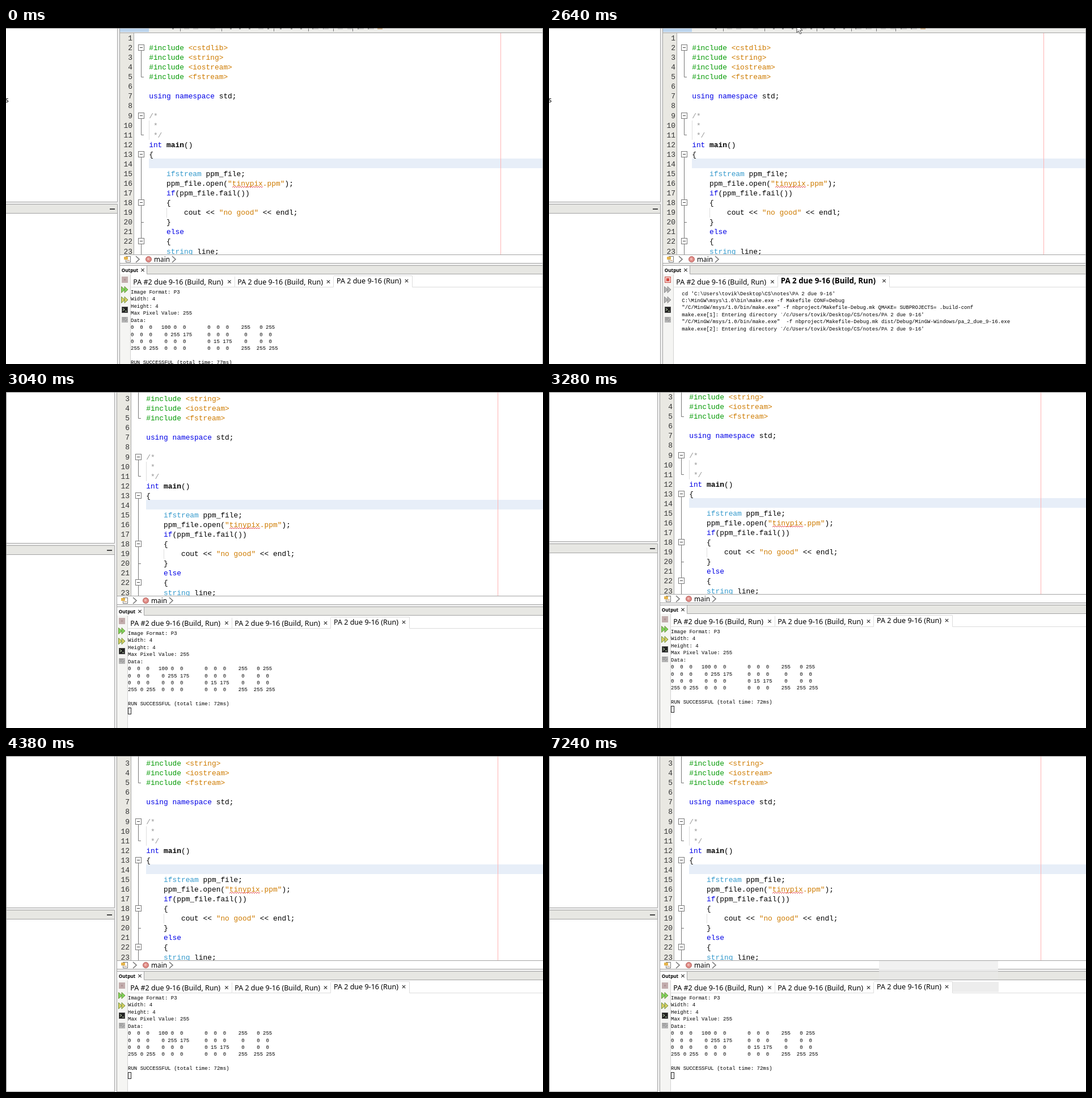
An HTML page that plays this animation: 947 px wide and 592 px high, repeating every 7800 ms.

```html
<!DOCTYPE html>
<html lang="en">
<head>
<meta charset="utf-8">
<title>Build and run</title>
<style>
html, body { margin: 0; width: 100%; height: 100%; overflow: hidden; background: #fff; }
svg { display: block; width: 947px; height: 592px; }
text { white-space: pre; }
.code { font: 12.86px "Liberation Mono", monospace; }
.out { font: 9.02px "Liberation Mono", monospace; }
.ui { font-family: "Noto Sans", "Open Sans", sans-serif; }
.k { fill: #000; } .g { fill: #009900; } .o { fill: #ce7b00; }
.b { fill: #0000e6; } .t { fill: #3399cc; } .c { fill: #969696; }
.m { fill: #000; font-weight: bold; }
</style>
</head>
<body>
<svg id="stage" viewBox="0 0 947 592"></svg>
<script>
const stage = document.getElementById('stage');
const LOOP = 7800;

function add(parent, tag, attrs = {}, content) {
  const el = document.createElementNS('http://www.w3.org/2000/svg', tag);
  for (const key in attrs) el.setAttribute(key, attrs[key]);
  if (content !== undefined) el.textContent = content;
  parent.append(el);
  return el;
}
const group = parent => add(parent, 'g');
const rect = (p, x, y, width, height, fill, extra) => add(p, 'rect', { x, y, width, height, fill, ...extra });
const path = (p, d, stroke, extra) => add(p, 'path', { d, stroke, fill: 'none', ...extra });
const label = (p, x, y, size, content, extra) =>
  add(p, 'text', { x, y, class: 'ui', 'font-size': size, ...extra }, content);
const show = (el, on) => el.setAttribute('visibility', on ? 'visible' : 'hidden');

const app = group(stage);
const LINE = '#a3a3a3', BAR = '#e7e7e3';
const codeY = n => 22 + 17.07 * (n - 1);

function drawEditor() {
  rect(app, 200, -80, 780, 88, '#eeeeeb');
  rect(app, 200, 0, 52, 7, '#bcd5ee');
  for (const x of [307, 380, 472, 533, 577, 611]) rect(app, x, 0, 1, 6, '#777');
  for (const x of [293, 395, 411, 428, 446, 461, 483, 502, 519, 540, 559, 620, 638]) rect(app, x, 0, 3, 2, '#555');
  for (const x of [314, 330, 360, 445, 542, 560, 585, 602, 622, 640]) rect(app, x, 0, 9, 2, '#b8b8b8');
  rect(app, 655, 0, 9, 2, '#b98a50');
  path(app, 'M200 8.5H980', LINE);
  rect(app, 201, 9, 24, 390, '#e9e8e2');
  path(app, 'M225.5 9V399', '#a8a8a8');
  rect(app, 252, 230, 728, 17, '#e7eef8');
  path(app, 'M252.5 163V197M283.5 317V334', '#dedede');

  const source = [
    '', '~g#include ~o<cstdlib>', '~g#include ~o<string>', '~g#include ~o<iostream>', '~g#include ~o<fstream>',
    '', '~busing ~bnamespace ~kstd;', '', '~c/*', '~c *', '~c */',
    '~bint ~mmain~k()', '~k{', '',
    '~t    ifstream ~kppm_file;',
    '~k    ppm_file.open(~o"tinypix.ppm"~k);',
    '~b    if~k(ppm_file.fail())',
    '~k    {', '~k        cout << ~o"no good"~k << endl;', '~k    }',
    '~b    else', '~k    {', '~t    string ~kline;'
  ];
  source.forEach((line, i) => {
    const y = codeY(i + 1);
    add(app, 'text', { x: 223, y, class: 'code', 'text-anchor': 'end', fill: '#333' }, i + 1);
    const row = add(app, 'text', { x: 252.2, y, class: 'code' });
    for (const part of line.split('~').slice(1)) add(row, 'tspan', { class: part[0] }, part.slice(1));
  });

  let wave = 'M399 281';
  for (let i = 1; i < 28; i++) wave += `L${399 + 2 * i} ${i % 2 ? 279 : 281}`;
  path(app, wave, '#e03030', { 'stroke-width': 0.9 });

  path(app, 'M238.5 40V86.5H243M238.5 159V188.5H243M238.5 228V399M238.5 342.5H243', '#777');
  for (const n of [2, 9, 13, 18, 22]) {
    const y = Math.round(codeY(n) - 10) + 0.5;
    rect(app, 233.5, y, 10, 10, '#fff', { stroke: '#777' });
    path(app, `M236 ${y + 5}H241`, '#444');
  }
  path(app, 'M872.5 9V399', '#ffb3b3');
}

function drawSidePanels() {
  rect(app, -10, -80, 210, 800, '#f0f0f0');
  rect(app, -10, -80, 206, 387, '#fff');
  rect(app, -10, 311, 206, 15, BAR);
  rect(app, -10, 326, 206, 400, '#fff');
  path(app, 'M196.5 -80V306.5H-10M-10 310.5H196.5V720M-10 326.5H196M200.5 0V720', LINE);
  rect(app, 183, 318, 9, 2, '#444');
  label(app, -1.2, 130.5, 12.5, 's');
}

function cross(p, x, y) {
  path(p, `M${x - 2.7} ${y - 2.7}l5.4 5.4m0 -5.4l-5.4 5.4`, '#333', { 'stroke-width': 1.2 });
}

function drawOutputFrame() {
  rect(app, 201, 399, 780, 320, '#fff');
  path(app, 'M201 399.5H980M201 414.5H980', LINE);
  rect(app, 201, 415, 780, 4, '#f0f0f0');
  rect(app, 211.5, 402.5, 8, 10, '#fff', { stroke: '#777' });
  rect(app, 208, 403, 7, 5, '#e5b44c');
  path(app, 'M213 409.5h5', '#b98e61');
  for (const x of [229, 293]) path(app, `M${x} 402l6 5.5l-6 5.5`, '#777', { 'stroke-width': 1.6 });
  add(app, 'circle', { cx: 251.5, cy: 407.5, r: 5, fill: '#df8b86', stroke: '#b45f5c' });
  add(app, 'circle', { cx: 251, cy: 407, r: 2, fill: '#f0bbb5' });
  label(app, 261, 412, 11.8, 'main');

  rect(app, 201, 419, 780, 14, BAR);
  rect(app, 201, 419, 48, 15, '#fff');
  path(app, 'M201 418.5H980M248.5 419V433.5H980', LINE);
  label(app, 203.8, 430, 8.15, 'Output', { 'font-weight': 'bold' });
  cross(app, 241, 426.5);
  rect(app, 201, 434, 18, 280, '#f5f5f3');
  path(app, 'M219.5 434V720', '#d2d2d2');

  rect(app, 204.5, 491.5, 10, 10, '#222', { stroke: '#555' });
  path(app, 'M206 494l3 2l-3 2M210 499h3', '#c9e3b8');
  rect(app, 204, 509, 11, 10, '#b4b4b4');
  path(app, 'M205 511h7M205 514h5M210 517l4 -4', '#888');
}

function runButtons(p, first, second, edge) {
  [[461, first], [479, second]].forEach(([y, fill]) => {
    for (const x of [203.5, 209]) add(p, 'path', { d: `M${x} ${y - 5.5}l6 5.5l-6 5.5z`, fill, stroke: edge });
  });
}

function tabs(p, list) {
  for (const [x, content, closeX, end, active, bold] of list) {
    const y = active ? 450 : 451.5;
    label(p, x, y, bold ? 13.3 : 12.54, content, bold ? { 'font-weight': 'bold' } : {});
    cross(p, closeX, y - 4.5);
    path(p, active ? `M${x - 5.5} 436.5H${end}.5V456.5H980` : `M${x - 4} 456.5H${end}.5V438`, '#dcdcdc');
  }
}

const outLine = (p, x, y, content) => add(p, 'text', { x, y, class: 'out' }, content);

function drawResults() {
  const p = group(app);
  rect(p, 204, 438, 11, 11, '#c2adad');
  rect(p, 208, 442, 3, 3, '#b09595');
  runButtons(p, '#7ed65a', '#d9cf62', '#6d8f3c');
  tabs(p, [
    [224.3, 'PA #2 due 9-16 (Build, Run)', 394, 403],
    [408.2, 'PA 2 due 9-16 (Build, Run)', 568.5, 577],
    [583, 'PA 2 due 9-16 (Run)', 706.5, 716, true]
  ]);
  const rows = [
    'Image Format: P3', 'Width: 4', 'Height: 4', 'Max Pixel Value: 255', 'Data:',
    '0  0  0   100 0  0       0  0  0    255   0 255',
    '0  0  0    0 255 175     0  0  0     0    0  0',
    '0  0  0    0  0  0       0 15 175    0    0  0',
    '255 0 255  0  0  0       0  0  0    255  255 255',
    '', 'RUN SUCCESSFUL (total time: 77ms)'
  ].map((row, i) => outLine(p, 220, 468 + 12.43 * i, row));
  rect(p, 220.5, 596.5, 5, 11, '#fff', { stroke: '#222' });
  return { node: p, status: rows.at(-1) };
}

function drawBuild() {
  const p = group(app);
  rect(p, 204.5, 438.5, 10, 10, '#f4c9c4', { stroke: '#c9554e' });
  rect(p, 207, 441, 5, 5, '#d6453e');
  runButtons(p, '#b5b5b5', '#b5b5b5', '#8b8b8b');
  tabs(p, [
    [224.3, 'PA #2 due 9-16 (Build, Run)', 394, 403],
    [408.8, 'PA 2 due 9-16 (Build, Run)', 591, 600, true, true]
  ]);
  const make = '"/C/MinGW/msys/1.0/bin/make.exe"';
  const enter = n => `make.exe[${n}]: Entering directory \`/c/Users/tovik/Desktop/CS/notes/PA 2 due 9-16'`;
  const lines = [
    "cd 'C:\\Users\\tovik\\Desktop\\CS\\notes\\PA 2 due 9-16'",
    'C:\\MinGW\\msys\\1.0\\bin\\make.exe -f Makefile CONF=Debug',
    make + ' -f nbproject/Makefile-Debug.mk QMAKE= SUBPROJECTS= .build-conf',
    enter(1),
    make + '  -f nbproject/Makefile-Debug.mk dist/Debug/MinGW-Windows/pa_2_due_9-16.exe',
    enter(2)
  ].map((line, i) => outLine(p, 234.3, 470.5 + 12.43 * i, line));
  return { node: p, lines };
}

drawEditor();
drawSidePanels();
drawOutputFrame();
const caret = rect(app, 275, 231, 2, 16, '#000');
const results = drawResults();
const build = drawBuild();

const tint = group(stage);
rect(tint, 582, 361, 210, 15, '#f1f1f1');
rect(tint, 582, 376, 210, 18, '#e9e9e9', { opacity: 0.7 });
rect(tint, 712, 398, 81, 18, '#ededed');

path(stage, 'M0 .5H947', '#8a8a8a');
const rightEdge = path(stage, 'M946.5 0V592', '#a8a8a8');
const leftEdge = path(stage, 'M.5 0V592', '#8a8a8a');
const bottomEdge = path(stage, 'M0 591.5H191M195 591.5H947', '#a3a3a3');

const beam = path(stage, 'M1 .5H3.5L4.5 1.5L5.5 .5H8M4.5 1.5V17.5M1 18.5H3.5L4.5 17.5L5.5 18.5H8', '#000');
const arrow = add(stage, 'path', {
  d: 'M0 0V14L3.2 11L5.5 16.5L8 15.4L5.6 10.2H10Z', fill: '#fff', stroke: '#333', 'stroke-width': 0.9
});

// time, x shift, y shift
const shifts = [[0, 0, 0], [2770, -3, -20], [2920, -5, -36], [3040, -5, -40], [3160, -5, -42], [3280, -5, -43],
  [3990, -5, -44], [4110, -5, -45], [4260, -5, -41], [4380, -5, -39]];
// time, pointer shape, x, y
const pointer = [[0], [1390, beam, 410, 125], [1510, beam, 427, 88], [1660, beam, 432, 60], [1780, beam, 436, 36],
  [1900, beam, 437, 14], [2050, arrow, 437, 3], [2290, arrow, 437, -3], [2440, arrow, 437, -6], [2770],
  [4660, beam, 582, 118], [4790, arrow, 782, 398], [4930, beam, 785, 483], [5090, beam, 819, 567], [5210],
  [5890, beam, 627, 85], [6010, beam, 680, 56], [6150, beam, 698, 48], [7120]];
const lineTimes = [0, 0, 1660, 1900, 2050, 2440];

const at = (table, t) => table.findLast(step => step[0] <= t);

function draw(t) {
  const [, dx, dy] = at(shifts, t);
  const [, shape, px, py] = at(pointer, t);
  const building = t >= 1120 && t < 2920;
  app.setAttribute('transform', `translate(${dx} ${dy})`);
  show(caret, t >= 1120 && t < 1510);
  show(results.node, !building);
  show(build.node, building);
  build.lines.forEach((line, i) => show(line, building && t >= lineTimes[i]));
  results.status.textContent = `RUN SUCCESSFUL (total time: ${t < 1120 ? 77 : 72}ms)`;
  show(tint, t >= 4790);
  show(rightEdge, !dx);
  show(leftEdge, dx);
  show(bottomEdge, t >= 4380);
  for (const el of [beam, arrow]) show(el, el === shape);
  if (shape) shape.setAttribute('transform', `translate(${px} ${py})`);
}

const start = performance.now();
function tick() {
  draw((performance.now() - start) % LOOP);
  requestAnimationFrame(tick);
}
tick();
</script>
</body>
</html>
```
